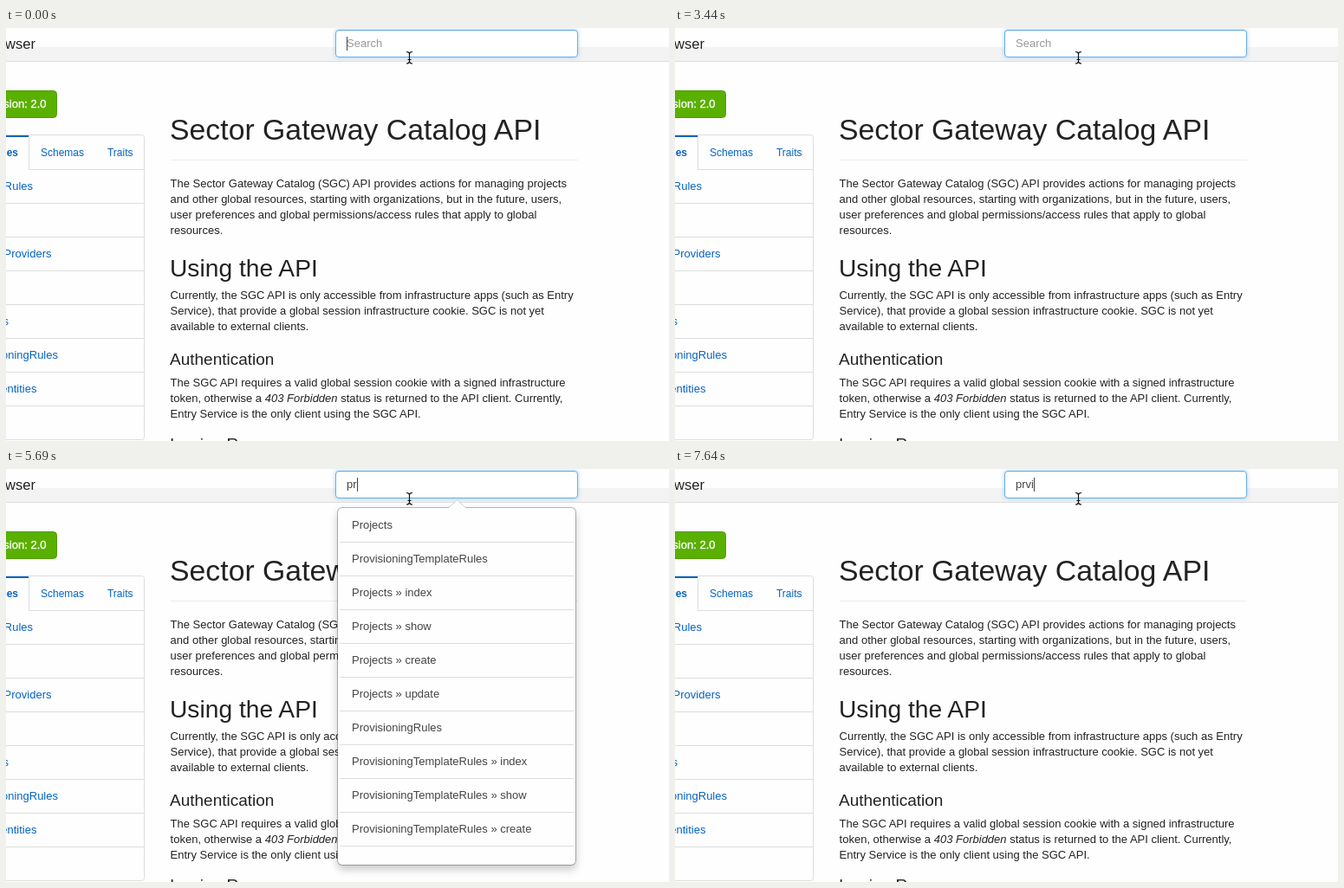
Write an HTML page that moves like this. It is 765 by 477 pixels and loops after 8000 ms.

```html
<!DOCTYPE html>
<html lang="en">
<head>
<meta charset="utf-8">
<title>API browser search</title>
<style>
  html, body { margin: 0; width: 100%; height: 100%; overflow: hidden; background: #fefefe; }
  body { font: 13px "Liberation Sans", Arial, sans-serif; color: #333; }
  #stage { position: relative; width: 765px; height: 477px; overflow: hidden; }
  #stage > * { position: absolute; }
  svg { left: 0; top: 0; overflow: hidden; }
  text { fill: #222; white-space: pre; }
  .link { fill: #0563c1; text-anchor: end; }
  .button { fill: #fff; stroke: #fff; stroke-width: .3px; text-anchor: end; }
  .line { stroke: #ddd; fill: none; shape-rendering: crispEdges; }

  #search {
    left: 380px; top: 2px; width: 280px; height: 32px; box-sizing: border-box;
    border: 1px solid #66afe9; border-radius: 4px; background: #fff;
    box-shadow: inset 0 1px 1px rgba(0,0,0,.075), 0 0 5px rgba(102,175,233,.55);
    padding-left: 12px; line-height: 30px; color: #444; white-space: pre;
  }
  #search.empty { color: #999; }
  #caret { left: 393px; top: 10px; width: 1px; height: 16px; background: #444; }

  #popover {
    left: 382px; top: 44px; width: 276px; height: 414px; box-sizing: border-box;
    border: 1px solid rgba(0,0,0,.27); border-radius: 6px; padding: 1px 2px;
    background: #fefefe; background-clip: padding-box;
    box-shadow: 0 5px 10px rgba(0,0,0,.2);
  }
  #popover svg { position: absolute; left: 126px; top: -10px; }
  ul { margin: 0; padding: 0; list-style: none; }
  li { height: 38px; line-height: 38px; padding-left: 14px; border-bottom: 1px solid #ddd; color: #444; }
</style>
</head>
<body>
<div id="stage">
  <svg id="page" width="765" height="477">
    <rect y="22" width="765" height="16" fill="#f3f3f3"/>
    <path class="line" d="M0 38.5H765"/>
    <text x="34" y="24" font-size="16.6" text-anchor="end">API Browser</text>

    <rect x="-40.5" y="72.5" width="99" height="31" rx="4" fill="#5ab000" stroke="#4f9c00"/>
    <text class="button" x="46.5" y="92">Version: 2.0</text>

    <path class="line" style="shape-rendering:auto" d="M0 123.5H156.5a3 3 0 0 1 3 3V472.5a3 3 0 0 1 -3 3H0"/>
    <path class="line" d="M26.5 124V163.5H159"/>
    <rect y="124" width="26" height="2" fill="#0563c1"/>
    <g font-size="12">
      <text class="link" x="14" y="148" font-weight="bold">Resources</text>
      <text class="link" x="90" y="148">Schemas</text>
      <text class="link" x="146.5" y="148">Traits</text>
    </g>
    <path class="line" style="stroke:#eee" d="M190 152.5H660"/>
  </svg>

  <div id="search"></div>
  <div id="caret"></div>

  <div id="popover">
    <svg width="24" height="12">
      <path d="M1 10.5L11.5 .8L22 10.5V12H1Z" fill="#fefefe"/>
      <path d="M1.5 9.8L11.5 .8L21.5 9.8" fill="none" stroke="#ccc"/>
    </svg>
    <ul id="results"></ul>
  </div>

  <svg width="765" height="477" fill="none">
    <path d="M462 27.5Q465 27.5 465.5 29.5Q466 27.5 469 27.5M465.5 29V40M462 41Q465 41 465.5 39Q466 41 469 41M463.5 36.5H467.5" stroke="#111" stroke-width="1.2"/>
  </svg>
</div>

<script>
const $ = id => document.getElementById(id);
const page = $("page"), search = $("search"), caret = $("caret"),
      popover = $("popover"), results = $("results");

function addText(x, y, html, attrs = "") {
  page.insertAdjacentHTML("beforeend", `<text x="${x}" y="${y}" ${attrs}>${html}</text>`);
}

function addParagraph(y, lines) {
  lines.forEach((line, i) => addText(189.6, y + 18 * i, line));
}

function addHeading(y, size, label) {
  addText(189, y, label, `font-size="${size}"`);
}

// Sidebar: right edge of each label, empty rows stay blank
const sidebar = [
  ["AccessRules", 31], null, ["IdentityProviders", 52.5], null,
  ["Projects", 3], ["ProvisioningRules", 60], ["Identities", 35.5], null
];
sidebar.forEach((item, i) => {
  const y = 163 + 39 * i;
  if (item) addText(item[1], y + 24, item[0], 'class="link"');
  if (i) page.insertAdjacentHTML("beforeend", `<path class="line" d="M0 ${y + .5}H159"/>`);
});

addHeading(129, 33.8, "Sector Gateway Catalog API");
addParagraph(184, [
  "The Sector Gateway Catalog (SGC) API provides actions for managing projects",
  "and other global resources, starting with organizations, but in the future, users,",
  "user preferences and global permissions/access rules that apply to global",
  "resources."
]);
addHeading(286.5, 28.2, "Using the API");
addParagraph(313, [
  "Currently, the SGC API is only accessible from infrastructure apps (such as Entry",
  "Service), that provide a global session infrastructure cookie. SGC is not yet",
  "available to external clients."
]);
addHeading(389, 19, "Authentication");
addParagraph(414, [
  "The SGC API requires a valid global session cookie with a signed infrastructure",
  'token, otherwise a <tspan font-style="italic">403 Forbidden</tspan> status is returned to the API client. Currently,',
  "Entry Service is the only client using the SGC API."
]);
addHeading(487, 19, "Issuing Rows");

const templates = "ProvisioningTemplateRules";
const matches = [
  "Projects", templates,
  ...["index", "show", "create", "update"].map(a => `Projects » ${a}`),
  "ProvisioningRules",
  ...["index", "show", "create"].map(a => `${templates} » ${a}`)
];
results.innerHTML = matches.map(m => `<li>${m}</li>`).join("");

const LOOP = 8000;
// Time, typed text, caret x
const typing = [[0, "", 393], [4340, "p", 400], [4640, "pr", 405], [7490, "prv", 411], [7640, "prvi", 414]];
const blinks = [450, 900, 1500, 1950, 2400, 3000, 3440, 3890, 5240, 5690, 6140, 6740, 7190, 7490];
const fading = .33;

function render(t) {
  const [, typed, caretX] = typing.filter(k => k[0] <= t).pop();
  const label = typed || "Search";
  if (search.textContent !== label) search.textContent = label;
  search.className = typed ? "" : "empty";

  caret.style.left = caretX + "px";
  caret.style.visibility = blinks.filter(b => b <= t).length % 2 ? "hidden" : "visible";

  popover.style.opacity = typed === "pr" ? 1 : typed === "prv" ? fading : 0;
  results.style.visibility = typed === "pr" ? "visible" : "hidden";
}

const start = performance.now();
function tick() {
  render((performance.now() - start) % LOOP);
  requestAnimationFrame(tick);
}
tick();
</script>
</body>
</html>
```
